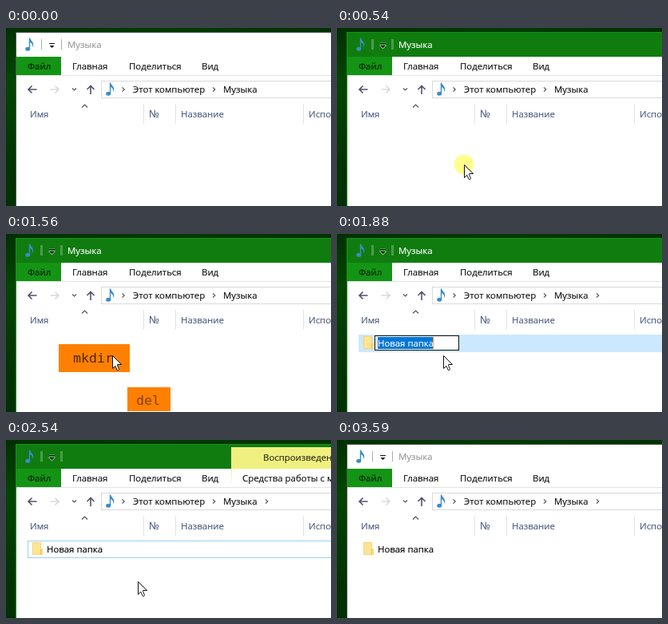
An HTML page for the animation above (3640 ms loop, 407 px wide and 223 px high).

```html
<!DOCTYPE html>
<html lang="ru">
<head>
<meta charset="utf-8">
<title>Музыка</title>
<style>
html, body { margin: 0; width: 100%; height: 100%; overflow: hidden; background: #012801; }
svg { display: block; width: 407px; height: 223px; }
text {
  font: 11.4px "Open Sans", "Noto Sans", sans-serif; white-space: pre;
  color: #111; fill: currentColor; stroke: currentColor; stroke-width: .15;
}
.head { color: #4c5c7e; }
.tag text { font: 16.6px "DejaVu Sans Mono", monospace; color: #804000; stroke: none; text-anchor: middle; }
.tag rect { fill: #ff8000; }
.line { fill: none; stroke: #55506a; stroke-width: 1.6; }
.thin { fill: none; stroke: #555; stroke-width: 1.2; }
</style>
</head>
<body>
<svg viewBox="0 0 407 223">
  <defs>
    <linearGradient id="side" x2="0" y2="1">
      <stop offset="0" stop-color="#023002"/>
      <stop offset=".3" stop-color="#034503"/>
      <stop offset=".8" stop-color="#023202"/>
      <stop offset="1" stop-color="#023002"/>
    </linearGradient>
    <linearGradient id="top">
      <stop offset="0" stop-color="#023002"/>
      <stop offset=".5" stop-color="#033a03"/>
      <stop offset="1" stop-color="#023002"/>
    </linearGradient>
    <linearGradient id="edge" x2="0" y2="1">
      <stop offset="0" stop-color="#f0f080"/>
      <stop offset="1" stop-color="#fff"/>
    </linearGradient>
    <g id="note">
      <ellipse cx="3.2" cy="14.200" rx="3" ry="2.500" fill="#3a8cc8"/>
      <path d="M4.800 14V.5H6.200C6.400 3.500 10.600 5 10.300 9.500C10.200 10.500 9.900 11.200 9.300 12C9.600 8.800 8.300 7 6.200 6V14Z" fill="#3a8cc8"/>
    </g>
    <path id="chev" class="thin" d="M0 -2.700L2.700 0L0 2.700"/>
    <path id="arrow" fill="none" stroke-width="1.6" d="M11.500 0H1M5.500 -4.500L1 0L5.500 4.500"/>
  </defs>

  <rect width="407" height="223" fill="url(#side)"/>
  <rect width="407" height="6" fill="url(#top)"/>
  <rect id="frame" x="12" y="5" width="395" height="218" fill="currentColor"/>
  <rect x="13" y="36" width="394" height="187" fill="#fff"/>
  <rect id="bar" x="13" y="6" width="394" height="30" fill="currentColor"/>

  <use href="#note" x="24" y="12"/>
  <g id="halo" stroke="#86c086" fill="none">
    <path d="M44.500 14V27M69.500 14V27" stroke-width="2"/>
    <path d="M54 19.500H61M55 22.500H60L57.500 25Z" stroke-width="2"/>
  </g>
  <path id="bars" d="M44.500 14V27M69.500 14V27" stroke="currentColor"/>
  <path d="M54 19.500H61" stroke="#111"/>
  <path d="M54.500 22H60.500L57.500 25Z" fill="#111"/>
  <text id="title" x="77" y="25">Музыка</text>

  <rect x="13" y="36" width="56" height="23" fill="#149414"/>
  <text x="27" y="52" style="color:#06200a">Файл</text>
  <text x="83" y="52">Главная</text>
  <text x="154" y="52">Поделиться</text>
  <text x="245" y="52">Вид</text>
  <g id="tools">
    <rect x="282" y="9" width="125" height="27" fill="#f0f080"/>
    <rect x="282" y="36" width="1" height="23" fill="url(#edge)"/>
    <text x="322" y="26" style="color:#2b2b17">Воспроизведение</text>
    <text x="296" y="52">Средства работы с музыкой</text>
  </g>
  <rect x="13" y="59" width="394" height="1" fill="#e2e3e4"/>

  <use href="#arrow" x="27" y="77" stroke="#55506a"/>
  <use href="#arrow" transform="translate(67 77) scale(-1 1)" stroke="#d9d9d9"/>
  <path class="thin" d="M83 75.500L85.500 78L88 75.500"/>
  <path class="line" d="M106 83V72.500M101.500 77L106 72.500L110.500 77"/>
  <rect x="119.500" y="66.500" width="300" height="21" fill="#fff" stroke="#d9d9d9"/>
  <use href="#note" x="125" y="68"/>
  <use href="#chev" x="145.500" y="77"/>
  <text x="159" y="81">Этот компьютер</text>
  <use href="#chev" x="259" y="77"/>
  <text x="272" y="81">Музыка</text>
  <use id="more" href="#chev" x="325" y="77"/>

  <path class="thin" d="M95 99.500L98.500 96L102 99.500"/>
  <path d="M172.500 95V120M212.500 95V120M372.500 95V120" stroke="#e3e3e3"/>
  <text class="head" x="30" y="112">Имя</text>
  <text class="head" x="179" y="112" style="font-size:12.8px">№</text>
  <text class="head" x="219" y="112">Название</text>
  <text class="head" x="379" y="112">Исполнители</text>

  <rect id="picked" x="27" y="126" width="380" height="22" fill="#cce8ff"/>
  <rect id="focus" x="27.500" y="126.500" width="390" height="21" fill="none" stroke="#99d1f5"/>
  <g id="folder">
    <path d="M33.500 128.500H43.500V136.500H45.500V143.500H33.500Z" fill="#ffe593" stroke="#f5d573"/>
    <path d="M43.500 137V143.500" stroke="#e9bd4e"/>
    <g id="edit">
      <rect x="47.500" y="127.500" width="105" height="18" fill="#fff" stroke="#111"/>
      <rect x="51" y="129" width="69" height="15" fill="#0078d7"/>
      <path d="M120.500 129V144" stroke="#ff8728"/>
    </g>
    <text id="name" x="51" y="141">Новая папка</text>
  </g>

  <g id="tags">
    <g class="tag"><rect x="66" y="138" width="89" height="35"/><text id="make" x="109" y="161">mkdir</text></g>
    <g class="tag"><rect x="152" y="192" width="54" height="30"/><text x="178" y="214">del</text></g>
  </g>

  <g id="mouse">
    <circle id="press" r="12.300" fill="#ffff8c" style="mix-blend-mode:multiply"/>
    <path d="M.5 .5V16.500L3.800 13.300L6.200 18.500H7.800L8.500 17.500L6.500 12.500V11.500H11.500Z" fill="#fff" stroke="#111"/>
  </g>
</svg>
<script>
const LOOP = 3640, STEP = 45;
const el = id => document.getElementById(id);
const show = (id, on) => { el(id).style.display = on ? "" : "none"; };
const paint = (id, color) => { el(id).style.color = color; };
const within = (t, a, b) => t >= a && t < b;

// Each move is a list of [time, x, y].
const moves = [
  [[180, 316, 218], [270, 258, 200], [360, 198, 181], [490, 159, 171]],
  [[770, 159, 171], [860, 168, 165], [1050, 179, 158]],
  [[1380, 179, 158], [1470, 151, 154], [1560, 133, 152]],
  [[2080, 133, 152], [2190, 150, 166], [2310, 165, 177]],
  [[2770, 165, 177], [2860, 190, 172], [2950, 240, 174],
   [3040, 300, 188], [3130, 333, 205], [3280, 336, 222]]
];

function mouseAt(t) {
  const move = moves.filter(m => m[0][0] <= t).pop();
  if (!move) return null;
  const start = move[0][0], last = move[move.length - 1];
  if (t >= last[0]) return last.slice(1);
  const now = start + Math.floor((t - start) / STEP) * STEP;
  const i = move.findIndex(p => p[0] > now);
  const [a, b] = [move[i - 1], move[i]];
  const k = (now - a[0]) / (b[0] - a[0]);
  return [1, 2].map(n => Math.round(a[n] + (b[n] - a[n]) * k));
}

function draw(t) {
  const active = within(t, 540, 3590);
  const made = t >= 1830;
  const editing = within(t, 1880, 2410);
  const tools = within(t, 1980, 2590);

  paint("frame", active ? "#149414" : "#4a5c4a");
  paint("bar", active ? "#107c10" : "#fff");
  paint("title", active ? "#fff" : "#999");
  paint("bars", active ? "#4c964c" : "#a5b0a5");
  show("halo", active);
  show("title", !tools);
  show("tools", tools);

  show("folder", made);
  show("more", made);
  show("picked", within(t, 1830, 2460));
  show("focus", within(t, 2460, 3590));
  show("edit", editing);
  paint("name", editing ? "#fff" : "#000");

  show("tags", within(t, 770, 1790));
  const fade = Math.floor((t - 770) / 56) + 1;
  el("tags").style.opacity = Math.max(0, Math.min(1, fade / 6));
  paint("make", within(t, 1470, 1790) ? "#4d2600" : "#804000");

  const spot = mouseAt(t);
  show("mouse", spot && t < 3310);
  if (spot) el("mouse").setAttribute("transform", `translate(${spot})`);
  show("press", within(t, 490, 640) || within(t, 1560, 1610) || within(t, 2360, 2540));
}

function tick() {
  draw(performance.now() % LOOP);
  requestAnimationFrame(tick);
}
tick();
</script>
</body>
</html>
```
